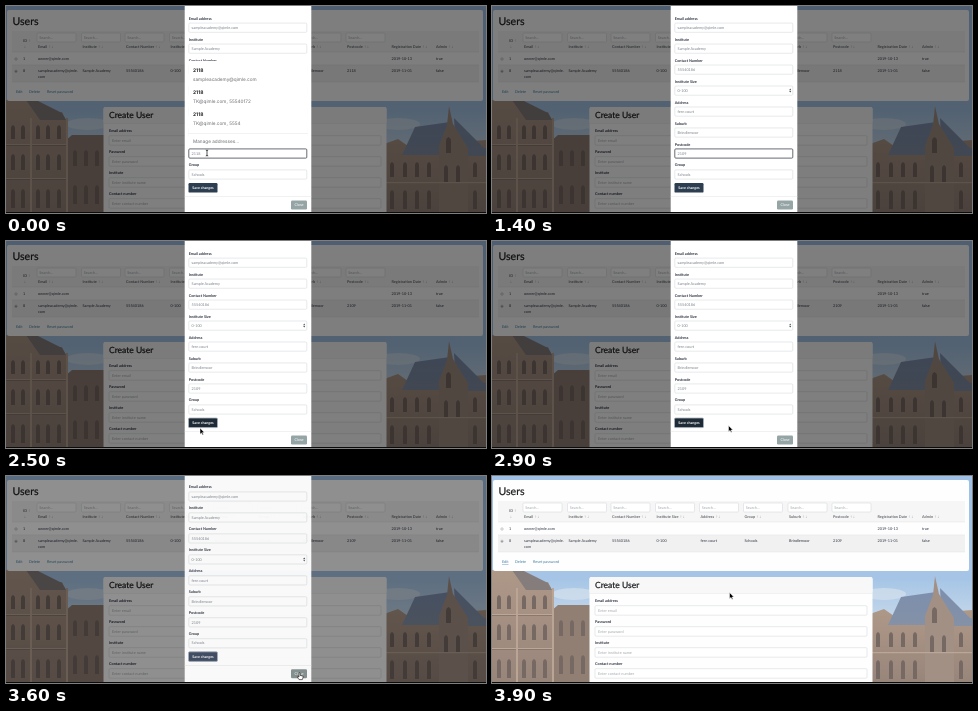
An HTML page that plays this animation: 480 by 207 pixels, repeating every 4 s.

```html
<!DOCTYPE html>
<html lang="en">
<head>
<meta charset="utf-8">
<title>User admin</title>
<style>
html, body { margin: 0; width: 100%; height: 100%; overflow: hidden; background: #000; }
svg { display: block; width: 100vw; height: 100vh; }
text { font: 3.8px Lato, sans-serif; fill: #2c3340; text-rendering: geometricPrecision; white-space: pre; }
.b { font-weight: 700; }
.head { font-weight: 700; fill: #666b70; }
.title { fill: #1b1c1e; stroke: #1b1c1e; stroke-width: .22; }
.soft { fill: #7b8288; }
.hint { fill: #a3a8ac; }
.link { fill: #3f7ea3; }
.menu { font: 4.7px Inter, sans-serif; fill: #6c6f73; }
.menu.b { font-size: 4.9px; font-weight: 700; fill: #222; }
.sort { font: 3.4px "DejaVu Sans", sans-serif; fill: #b4b8bb; }
</style>
</head>
<body>
<svg viewBox="0 0 480 207" preserveAspectRatio="none">
  <defs>
    <linearGradient id="sky" x2="0" y2="1">
      <stop offset="0" stop-color="#9fc0e4"/>
      <stop offset=".5" stop-color="#a6c5e6"/>
      <stop offset=".7" stop-color="#c6d8e9"/>
    </linearGradient>
    <linearGradient id="stone" x2="0" y2="1">
      <stop offset="0" stop-color="#ae9888"/>
      <stop offset="1" stop-color="#98857a"/>
    </linearGradient>
    <linearGradient id="slate" x2="0" y2="1">
      <stop offset="0" stop-color="#7d8fae"/>
      <stop offset="1" stop-color="#8491a6"/>
    </linearGradient>
  </defs>
  <g id="photo"></g>
  <g id="page"></g>
  <rect id="shade" width="480" height="207"/>
  <g id="modal"></g>
  <g id="pointer">
    <path id="arrow" d="M0 0V6.2L1.5 4.9L2.5 7.1L3.5 6.6L2.5 4.6H4.4Z" fill="#000" stroke="#fff" stroke-width=".5"/>
    <path id="beam" d="M-1.2 -3Q0 -3 0 -2Q0 -3 1.2 -3M0 -2.4V2.4M-1.2 3Q0 3 0 2Q0 3 1.2 3" fill="none" stroke="#111" stroke-width=".7"/>
    <path id="hand" d="M-1 -3Q-.4 -3.7 .2 -3V-.6L2.6 0Q3.2 .4 3 1.4L2.4 3.6H-1L-2.8 .8Q-2.4 0 -1 1Z" fill="#fff" stroke="#111" stroke-width=".6"/>
  </g>
  <rect y="206" width="480" height="1" fill="#0b0b0c"/>
</svg>
<script>
const $ = id => document.getElementById(id);
const rect = (x, y, w, h, fill, more = '') =>
  `<rect x="${x}" y="${y}" width="${w}" height="${h}" fill="${fill}" ${more}/>`;
const text = (x, y, s, cls = '', more = '') => `<text x="${x}" y="${y}" class="${cls}" ${more}>${s}</text>`;
const field = (x, y, w, h, more = '') =>
  rect(x, y, w, h, '#fff', `rx="1" stroke="#ced2d5" stroke-width=".5" ${more}`);
const path = (d, fill) => `<path d="${d}" fill="${fill}"/>`;

const MAIL = 'sampleacademy@qimle.com';
const SCHOOL = 'Sample Academy', PHONE = '55540186', STREET = 'fern court', TOWN = 'Brindlemoor';

function drawPhoto() {
  const arch = (x, y, w, h) =>
    path(`M${x} ${y + h}V${y + w / 2}Q${x} ${y} ${x + w / 2} ${y - 1}Q${x + w} ${y} ${x + w} ${y + w / 2}V${y + h}Z`, '#766862');
  let s = rect(0, 0, 480, 207, 'url(#sky)');
  s += '<g fill="#dbe5ee" opacity=".6"><ellipse cx="82" cy="118" rx="22" ry="6"/><ellipse cx="392" cy="118" rx="22" ry="6"/></g>';
  // left wing
  s += path('M58 136L66 129H98V207H58Z', '#917f74');
  s += path('M0 94H22L30 106H56L62 118V207H0Z', 'url(#stone)');
  s += path('M20 94H30L56 107L60 114H34Z', '#857d7c');
  for (const y of [138, 172]) s += rect(0, y, 62, 1.2, '#bba797') + rect(0, y + 1.2, 62, .8, '#83726a');
  for (const x of [5, 15, 30, 40, 51]) s += arch(x, 120, 4, 13) + arch(x, 149, 4, 15) + arch(x, 184, 4, 18);
  for (const x of [67, 78, 89]) s += arch(x, 145, 4, 15) + arch(x, 180, 4, 18);
  for (const x of [24, 60]) s += rect(x, 112, 2, 95, '#baa595');
  // right wing
  s += path('M378 138L392 133L402 140L480 134V207H378Z', 'url(#stone)');
  s += path('M396 149L409 121L444 116V149Z', 'url(#slate)') + path('M448 112L478 142H480V150H450Z', 'url(#slate)');
  s += path('M433 207V140L441 119L443 100L447 118L462 142V207Z', '#a39084');
  for (const x of [384, 397, 409, 421, 467]) s += arch(x, 157, 4, 14) + arch(x, 185, 4, 18);
  s += arch(440, 132, 5, 15) + arch(438, 160, 4, 16) + arch(450, 160, 4, 16) + rect(378, 176, 102, 1.2, '#bba797');
  $('photo').innerHTML = s;
}

function drawPage() {
  const cols = [
    ['Email', 32], ['Institute', 76.5], ['Contact Number', 120], ['Institute Size', 164.5], ['Address', 208.5],
    ['Group', 252.5], ['Suburb', 297], ['Postcode', 341], ['Registration Date', 385.5], ['Admin', 430]
  ];
  const row = ['sampleacademy@qimle.', SCHOOL, PHONE, '0-100', STREET, 'Schools', TOWN, '', '2019-11-01', 'false'];
  const sort = '<tspan class="sort" dx="1">↑↓</tspan>';
  let s = rect(1, 4, 476, 91, '#fefefe', 'rx="2"');
  s += text(6.5, 19, 'Users', 'title', 'style="font-size:10.6px"');
  s += rect(6, 25, 467, 21, '#f6f6f6') + rect(6, 59, 467, 17, '#f1f1f1');
  for (const y of [46, 59, 76]) s += rect(6, y - .3, 467, .5, '#e0e2e3');
  s += text(17, 36, 'ID<tspan class="sort" dx="1">↑</tspan>', 'head') + text(17.5, 42, '↓', 'sort');
  cols.forEach(([name, x], i) => {
    if (i < 8) s += field(x - 1, 27, 39, 9) + text(x + 1.2, 32.8, 'Search...', 'hint');
    s += text(x, 42.2, name + sort, 'head') + text(x, 66.4, row[i]);
  });
  s += text(32, 72.4, 'com') + text(341, 66.4, '', '', 'id="cell"');
  s += text(17, 54, '1') + text(32, 54, 'owner@qimle.com') + text(385.5, 54, '2019-10-13') + text(430, 54, 'true') + text(17, 66.4, '8');
  for (const y of [53, 65.3]) s += `<circle cx="10" cy="${y}" r="1.2" fill="none" stroke="#90969b" stroke-width=".5"/>`;
  s += '<circle cx="10" cy="65.3" r=".6" fill="#555c63"/>';
  s += text(10, 87, 'Edit', 'link', 'id="edit"') + text(23, 87, 'Delete', 'link') + text(41, 87, 'Reset password', 'link');

  s += rect(97.5, 101, 283, 110, '#fefefe', 'rx="2"') + rect(97.5, 101, 283, 16, '#f8f8f8', 'rx="2"');
  s += rect(97.5, 117, 283, .5, '#e0e2e3');
  s += text(103, 112.2, 'Create User', 'title', 'style="font-size:8.5px"');
  [['Email address', 'email'], ['Password', 'password'], ['Institute', 'institute name'], ['Contact number', 'contact number']]
    .forEach(([label, hint], i) => {
      const y = 126.3 + i * 21;
      s += text(103, y, label, 'b') + field(103, y + 3.4, 272, 9.5) + text(106, y + 9.5, 'Enter ' + hint, 'hint');
    });
  $('page').innerHTML = s;
}

function drawModal() {
  const rows = [
    ['Email address', MAIL], ['Institute', SCHOOL], ['Contact Number', PHONE], ['Institute Size', '0-100'],
    ['Address', STREET], ['Suburb', TOWN], ['Postcode', ''], ['Group', 'Schools']
  ];
  let s = rect(178.7, -10, 126.6, 230, '#fff');
  rows.forEach(([label, value], i) => {
    const y = 13.7 + i * 20.97, post = label === 'Postcode';
    s += text(182.7, y, label, 'b') + field(182.8, y + 3.4, 118, 9.2, post ? 'id="post"' : '');
    s += text(185.6, y + 9.2, value, 'soft', post ? 'id="code"' : '');
  });
  s += path('M297.2 84.2L298.2 82.6L299.2 84.2ZM297.2 85L298.2 86.6L299.2 85Z', '#454b50');
  s += rect(190.4, 144.8, .5, 5.4, '#222', 'id="caret"');
  s += rect(182.5, 177, 29, 9.6, '#2c3e50', 'id="save" rx="1.2"');
  s += text(197, 183.1, 'Save changes', 'b', 'text-anchor="middle" style="fill:#fff;font-size:3.6px"');
  s += rect(178.7, 190.3, 126.6, .5, '#dfe2e4');
  s += rect(285, 194.5, 16, 9, '#95a5a6', 'id="close" rx="1.2"');
  s += text(293, 200.3, 'Close', '', 'text-anchor="middle" style="fill:#fff"');
  let m = rect(182.3, 55, 119.4, 87, '#fff') + rect(182.3, 127, 119.4, .5, '#e3e4e5');
  [MAIL, 'TK@qimle.com, 55540172', 'TK@qimle.com, 5554'].forEach((line, i) => {
    m += text(187, 66.3 + i * 22, '2118', 'menu b') + text(187, 74.6 + i * 22, line, 'menu');
  });
  m += text(187, 136.6, 'Manage addresses...', 'menu');
  $('modal').innerHTML = s + `<g id="menu">${m}</g>`;
}

const show = (id, on) => $(id).setAttribute('visibility', on ? 'visible' : 'hidden');
const set = (id, key, value) => $(id).setAttribute(key, value);

// time, x, y
const moves = [
  [0, 201, 147], [1600, 201, 148], [1700, 200, 158], [1800, 197, 176], [1900, 194.5, 186], [2100, 194, 187],
  [2500, 194, 187], [2700, 215, 188], [2900, 236.5, 184.5], [3100, 240, 184.5], [3300, 268, 192],
  [3500, 293, 199.5], [3600, 294, 200], [3700, 293, 198], [3800, 266, 152], [3900, 237.5, 116.5]
];

function place(t) {
  let i = moves.length - 1;
  while (moves[i][0] > t) i--;
  const a = moves[i], b = moves[i + 1] || a;
  const k = b === a ? 0 : (t - a[0]) / (b[0] - a[0]);
  return [a[1] + (b[1] - a[1]) * k, a[2] + (b[2] - a[2]) * k];
}

function draw(ms) {
  const t = Math.floor(ms % 4000 / 100) * 100;
  $('code').textContent = t < 100 ? '2118' : t < 200 ? '211' : t < 1100 ? '21' : t < 1400 ? '210' : '2109';
  $('cell').textContent = t < 2500 ? '2118' : '2109';
  show('menu', t < 1100);
  show('caret', t >= 900 && t < 1100);

  const focus = t < 2500;
  set('post', 'stroke', focus ? '#555b62' : '#ced2d5');
  set('post', 'stroke-width', focus ? .9 : .5);
  set('save', 'fill', t >= 2200 && t < 3100 ? '#1e2b37' : t >= 3600 ? '#3d4a60' : '#2c3e50');
  set('save', 'stroke', t >= 2500 ? '#a9b3bd' : 'none');
  set('save', 'stroke-width', .8);
  set('close', 'fill', t >= 3500 ? '#84918f' : '#95a5a6');

  // fade out: opacity, rise, backdrop
  const [alpha, lift, dark] = t < 3600 ? [1, 0, .5] : t < 3700 ? [.95, -1.2, .44] : t < 3800 ? [.1, -7.8, .05] : [0, -12, 0];
  set('modal', 'opacity', alpha);
  set('modal', 'transform', `translate(0 ${lift})`);
  set('shade', 'opacity', dark);
  set('edit', 'text-decoration', t >= 3900 ? 'underline' : 'none');

  const beam = t < 1700 || t === 3700, hand = t === 3600;
  const seen = t < 100 || t >= 1600;
  show('beam', seen && beam);
  show('hand', seen && hand);
  show('arrow', seen && !beam && !hand);
  set('pointer', 'transform', `translate(${place(t)})`);
}

drawPhoto();
drawPage();
drawModal();
const start = performance.now();
function tick() {
  draw(performance.now() - start);
  requestAnimationFrame(tick);
}
tick();
</script>
</body>
</html>
```
